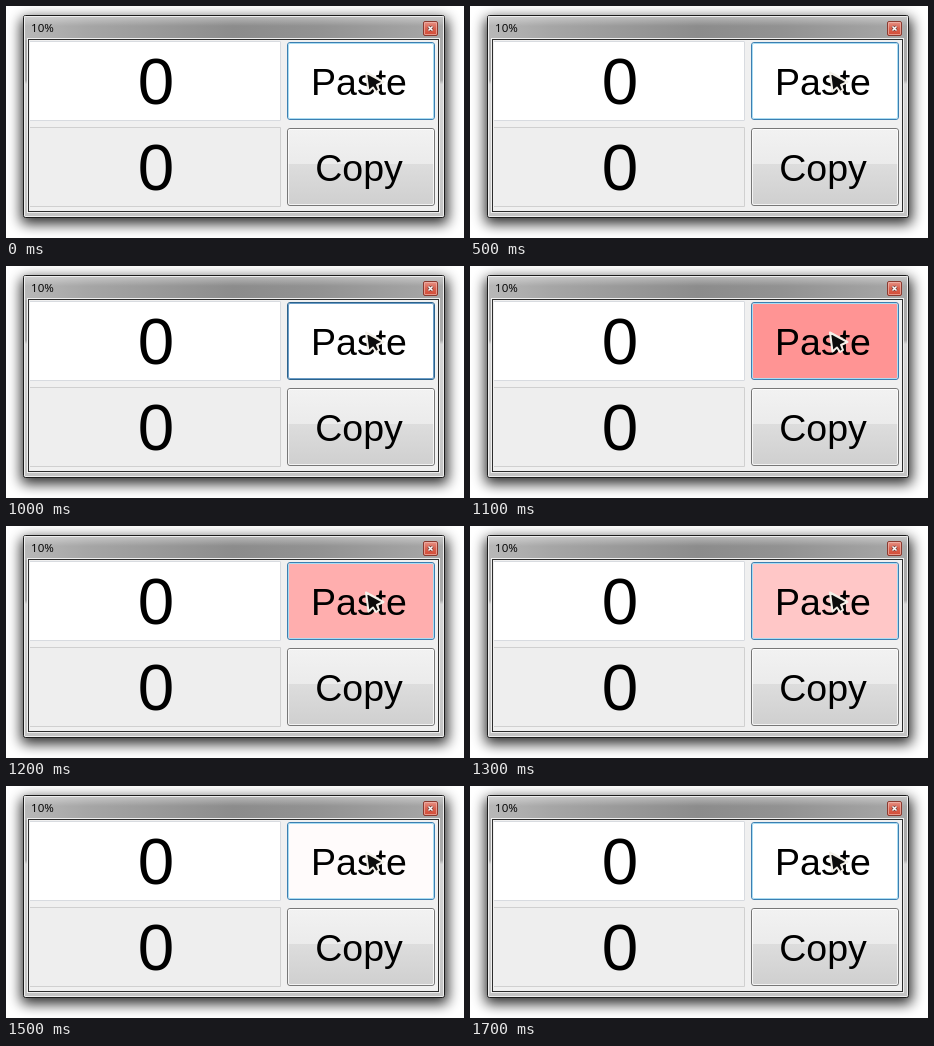
An HTML page that plays this animation: 458 px wide and 232 px high, repeating every 1.9 s.

```html
<!DOCTYPE html>
<html lang="en">
<head>
<meta charset="utf-8">
<title>Paste button</title>
<style>
html, body { margin: 0; width: 100%; height: 100%; overflow: hidden; background: #fff; }
svg { display: block; width: 458px; height: 232px; }
text { font-family: "Liberation Sans", Arial, sans-serif; text-anchor: middle; }
.digit { font-size: 65.5px; }
.label { font-size: 37.5px; }
.title { font: 11.6px "Open Sans", sans-serif; text-anchor: start; }
</style>
</head>
<body>
<svg viewBox="0 0 458 232">
  <defs>
    <filter id="blur" x="-10%" y="-15%" width="120%" height="130%"><feGaussianBlur stdDeviation="6.5"/></filter>
    <linearGradient id="bar">
      <stop offset="0" stop-color="#b8b8b8"/><stop offset=".15" stop-color="#a6a6a6"/>
      <stop offset=".5" stop-color="#8c8c8c"/><stop offset=".7" stop-color="#929292"/>
      <stop offset="1" stop-color="#a8a8a8"/>
    </linearGradient>
    <linearGradient id="shine" x2="0" y2="1">
      <stop offset="0" stop-color="#fff" stop-opacity=".4"/><stop offset="1" stop-color="#fff" stop-opacity="0"/>
    </linearGradient>
    <linearGradient id="side" x2="0" y2="1">
      <stop offset="0" stop-color="#aaa"/><stop offset=".32" stop-color="#aaa"/>
      <stop offset=".34" stop-color="#d8d8d8"/><stop offset="1" stop-color="#c4c4c4"/>
    </linearGradient>
    <linearGradient id="face" x2="0" y2="1">
      <stop offset="0" stop-color="#f2f2f2"/><stop offset=".46" stop-color="#ebebeb"/>
      <stop offset=".46" stop-color="#dddddd"/><stop offset="1" stop-color="#cfcfcf"/>
    </linearGradient>
    <linearGradient id="red" x2="0" y2="1">
      <stop offset="0" stop-color="#e8968a"/><stop offset=".5" stop-color="#d9604e"/><stop offset="1" stop-color="#d24a35"/>
    </linearGradient>
  </defs>

  <rect x="15" y="12" width="427" height="206" rx="5" fill="#000" opacity=".82" filter="url(#blur)"/>

  <rect x="17.5" y="9.5" width="421" height="202" rx="2" fill="url(#side)" stroke="#1c1c1c"/>
  <rect x="18" y="10" width="420" height="24" fill="url(#bar)"/>
  <rect x="18" y="10" width="420" height="10" fill="url(#shine)"/>
  <rect x="18.5" y="10.5" width="419" height="200" rx="1" fill="none" stroke="#eee"/>
  <rect x="21.5" y="32.5" width="412" height="174" fill="none" stroke="#eee"/>
  <rect x="22.5" y="33.5" width="410" height="172" fill="#f0f0f0" stroke="#2c2c2c"/>
  <text class="title" x="25" y="26">10%</text>

  <rect x="417.5" y="15.5" width="14" height="14" rx="1.5" fill="url(#red)" stroke="#8a3a30"/>
  <rect x="418.5" y="16.5" width="12" height="12" rx=".5" fill="none" stroke="#f0b8ae" stroke-opacity=".7"/>
  <path d="M422.5 20.5l4 4m0-4l-4 4" stroke="#6b3a36" stroke-width="3"/>
  <path d="M422.5 20.5l4 4m0-4l-4 4" stroke="#fff" stroke-width="1.5"/>

  <rect x="24" y="35" width="251" height="80" fill="#fff"/>
  <path d="M24 35.5H274.5V114.5H24" fill="none" stroke="#d8dbe0"/>
  <rect x="24" y="121" width="251" height="80" fill="#eee"/>
  <path d="M24 121.5H274.5V200.5H24" fill="none" stroke="#d0d0d0"/>
  <text class="digit" x="150" y="97.5">0</text>
  <text class="digit" x="150" y="183.5">0</text>

  <rect id="paste" x="281.5" y="36.5" width="147" height="77" rx="2.5"/>
  <rect id="ring" x="282.5" y="37.5" width="145" height="75" rx="1.5" fill="none"/>
  <text class="label" x="353" y="89">Paste</text>

  <rect x="281.5" y="122.5" width="147" height="77" rx="2.5" fill="url(#face)" stroke="#777"/>
  <rect x="282.5" y="123.5" width="145" height="75" rx="1.5" fill="none" stroke="#fff" stroke-opacity=".75"/>
  <text class="label" x="353" y="175">Copy</text>

  <path d="M360 66.5L377.5 76L371 79L373 84L370 86L367 81.5L362.5 85.5Z"
    fill="#0c0c0c" stroke="#f4f1ea" stroke-width="2" stroke-linejoin="round"/>
</svg>
<script>
const LOOP = 1900, STEP = 100, PRESS = 1000, FLASH = 1100;
const paste = document.getElementById("paste");
const ring = document.getElementById("ring");

function draw(now) {
  const t = Math.floor(now % LOOP / STEP) * STEP;
  // The click flashes red, then fades linearly back to white.
  const tint = t < FLASH ? 255 : Math.min(255, Math.round(148 + (t - FLASH) * 0.257));
  paste.setAttribute("fill", `rgb(255,${tint},${tint})`);
  const pressed = t === PRESS;
  paste.setAttribute("stroke", pressed ? "#2c628b" : "#3c7fb1");
  ring.setAttribute("stroke", pressed ? "#6a9cc6" : "#a9dcf2");
  requestAnimationFrame(draw);
}
draw(performance.now());
</script>
</body>
</html>
```
